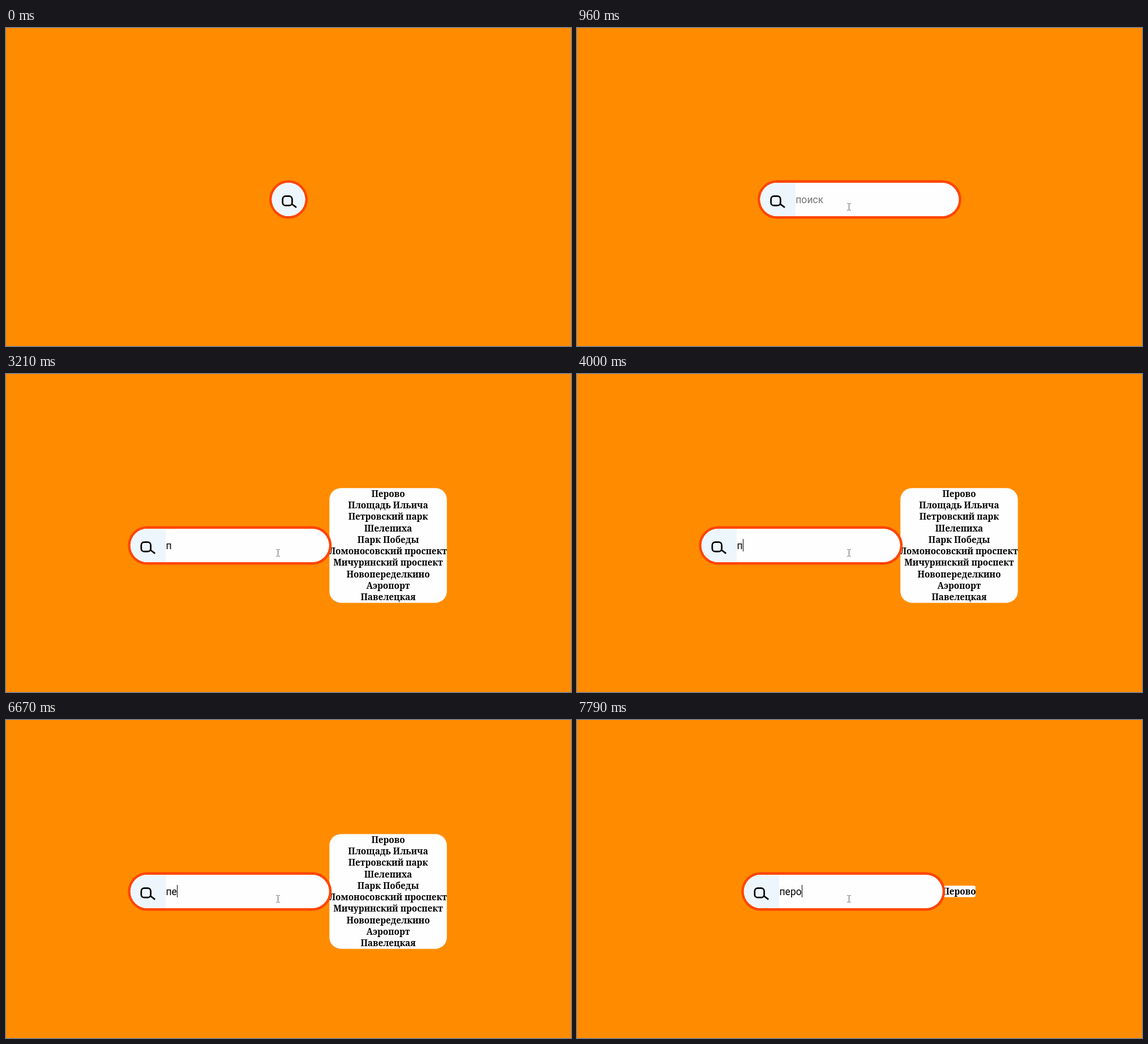
Animation of 998 by 561 pixels, one loop 8 s. Source, as an HTML page:

```html
<!DOCTYPE html>
<html lang="ru">
<head>
<meta charset="utf-8">
<title>Поиск</title>
<style>
  html, body { margin: 0; width: 100%; height: 100%; overflow: hidden; background: #ff8c00; }
  svg { display: block; width: 998px; height: 561px; }
  .input { font: 17.6px Roboto, sans-serif; }
  .list text { font: 700 15.3px "Noto Serif", serif; text-anchor: middle; }
  .line { fill: none; stroke: #000; stroke-width: 2.7; }
  .beam { fill: none; stroke: #555; stroke-width: 1; }
</style>
</head>
<body>
<svg viewBox="0 0 998 561">
  <defs>
    <clipPath id="inside"><rect id="hole" x="4.5" y="273" height="59" rx="29.5"/></clipPath>
  </defs>
  <rect width="998" height="561" fill="#ff8c00"/>
  <g id="list" class="list"></g>
  <g id="pill">
    <rect id="rim" y="268.5" height="68" rx="34" fill="#ff4500"/>
    <g clip-path="url(#inside)">
      <rect y="268" width="360" height="70" fill="#fefefe"/>
      <rect y="268" width="67" height="70" fill="#eef6fd"/>
      <rect class="line" x="23.6" y="296.6" width="16.8" height="16.6" rx="5.3"/>
      <path class="line" d="M39 309.8L48 316.6"/>
      <text id="typed" class="input" x="67.2" y="309"></text>
      <rect id="caret" y="291" width="1" height="22"/>
    </g>
  </g>
  <path id="arrow" d="M505.5 299.5v16.2l3.7-3.5 2.4 5.6 2.3-1-2.4-5.4h5.2z" fill="#fff" stroke="#000"/>
  <path id="beam" class="beam" d="M477.5 309.5h2l1 1 1-1h2M480.5 310.5v10M477.5 321.5h2l1-1 1 1h2"/>
</svg>
<script>
const LOOP = 8000, MID_X = 499, MID_Y = 302.4, ROW = 20.25;
const $ = id => document.getElementById(id);

const typing = [[0, ""], [3040, "п"], [6460, "пе"], [6880, "пер"], [7460, "перо"]];
const results = [
  { at: 0, width: 0, names: [] },
  { at: 3170, width: 207.5, names: ["Перово", "Площадь Ильича", "Петровский парк", "Шелепиха",
    "Парк Победы", "Ломоносовский проспект", "Мичуринский проспект", "Новопеределкино",
    "Аэропорт", "Павелецкая"] },
  { at: 7040, width: 145, names: ["Перово", "Новопеределкино", "Первомайская"] },
  { at: 7620, width: 57.5, names: ["Перово"] }
];
const caretOn = [[1000, 1500], [2000, 2500], [3000, 3170], [3330, 3500],
  [4000, 4500], [5000, 5500], [6000, LOOP]];

const last = (steps, t, time) => steps.filter(s => time(s) <= t).pop();
const clamp = v => Math.max(0, Math.min(1, v));
const set = (el, attrs) => { for (const k in attrs) el.setAttribute(k, attrs[k]); };
const show = (el, on) => { el.style.visibility = on ? "visible" : "hidden"; };

function make(tag, attrs, parent) {
  const el = document.createElementNS("http://www.w3.org/2000/svg", tag);
  set(el, attrs);
  return parent.appendChild(el);
}

// The CSS "ease" curve: cubic-bezier(.25, .1, .25, 1)
function ease(p) {
  const bez = (a, b, u) => 3 * a * u * (1 - u) ** 2 + 3 * b * u * u * (1 - u) + u ** 3;
  let lo = 0, hi = 1;
  for (let i = 0; i < 20; i++) {
    const u = (lo + hi) / 2;
    if (bez(.25, .25, u) < p) lo = u; else hi = u;
  }
  return bez(.1, 1, lo);
}

let shown = null;
function drawList(result, left) {
  if (result === shown) return;
  shown = result;
  $("list").replaceChildren();
  const { width, names } = result;
  if (!names.length) return;
  const height = names.length * ROW, top = MID_Y - height / 2;
  make("rect", { x: left, y: top, width, height, rx: width / 10, ry: height / 10, fill: "#fefefe" }, $("list"));
  names.forEach((name, i) => {
    make("text", { x: left + width / 2, y: top + (i + .5) * ROW + 5.7 }, $("list")).textContent = name;
  });
}

function draw(t) {
  const result = last(results, t, r => r.at);
  const width = 68 + 292 * ease(clamp((t - 460) / 500));
  const left = MID_X - (width + result.width) / 2;
  set($("pill"), { transform: `translate(${left} 0)` });
  set($("rim"), { width });
  set($("hole"), { width: width - 9 });
  drawList(result, left + width - 4);

  const text = last(typing, t, s => s[0])[1];
  const typed = $("typed");
  const label = text || "поиск";
  if (typed.textContent !== label) typed.textContent = label;
  set(typed, { fill: text ? "#000" : "#757575" });
  const end = text ? typed.getComputedTextLength() : 0;
  set($("caret"), { x: Math.round(left + 67.2 + end) - left });
  show($("caret"), caretOn.some(([a, b]) => t >= a && t < b));

  show($("arrow"), t >= 250 && t < 620);
  show($("beam"), t >= 620);
  const away = 1 - clamp((t - 620) / 180);
  set($("beam"), { transform: `translate(${Math.round(25 * away)} ${Math.round(-12 * away)})` });
}

const start = performance.now();
function tick() {
  draw((performance.now() - start) % LOOP);
  requestAnimationFrame(tick);
}
tick();
</script>
</body>
</html>
```
